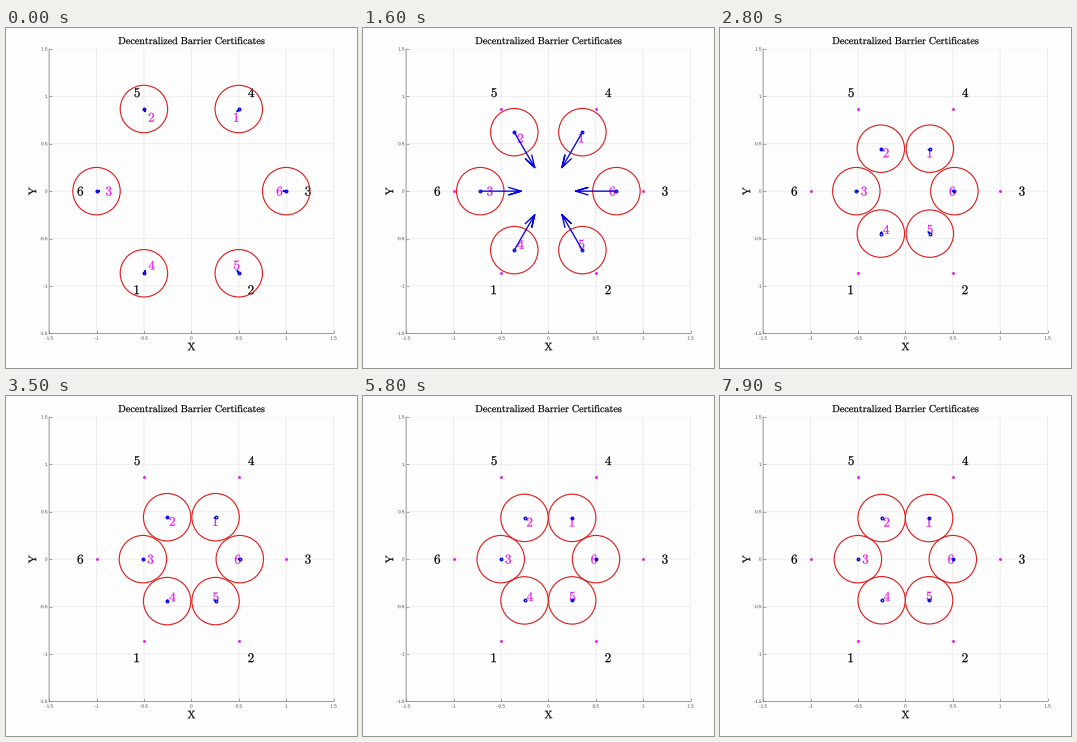
Animation, 351 px wide and 340 px high, one loop 8 s. Source, as a matplotlib script:

```python
import numpy as np
import matplotlib.pyplot as plt
from matplotlib.animation import FuncAnimation
from matplotlib.patches import Circle, PathPatch
from matplotlib.textpath import TextPath
from matplotlib.transforms import Affine2D

W, H, DPI = 351, 340, 100
FRAMES, STEP = 80, 100
SIDE, LEFT, TOP = 284.5, 43.1, 20.9
UNIT = SIDE / 3                    # pixels per data unit

RED, BLUE, MAGENTA = "#de1f1f", "#0808e0", "#e818e8"
PAPER = "#fdfdfd"
ANGLES = np.radians(60 * np.arange(1, 7))
DIRS = np.column_stack([np.cos(ANGLES), np.sin(ANGLES)])

# Speed-up, braking and settling of the common distance to the centre
V_MAX, V0, TAU = 0.367, 0.02, 1.19
T_BRAKE, T_SETTLE = 1.7, 2.8
R_END, GAP, TAU_END = 0.5, 0.017, 1.54
ARROW = 1.56                       # arrow length per unit of speed


def px(n):
    """Pixels to points."""
    return n * 72 / DPI


def approach(t):
    decay = np.exp(-t / TAU)
    dist = 1 - V_MAX * t + (V_MAX - V0) * TAU * (1 - decay)
    return dist, V_MAX - (V_MAX - V0) * decay


def settle(t):
    gap = GAP * np.exp(-(t - T_SETTLE) / TAU_END)
    return R_END + gap, gap / TAU_END


def brake(t):
    """Cubic Hermite blend between approach and settle."""
    (r0, v0), (r1, v1) = approach(T_BRAKE), settle(T_SETTLE)
    d = T_SETTLE - T_BRAKE
    s = (t - T_BRAKE) / d
    m0, m1 = -v0 * d, -v1 * d
    a = 2 * (r0 - r1) + m0 + m1
    b = 3 * (r1 - r0) - 2 * m0 - m1
    return ((a * s + b) * s + m0) * s + r0, -((3 * a * s + 2 * b) * s + m0) / d


def state(t):
    """Distance from the centre and inward speed at time t (seconds)."""
    if t < T_BRAKE:
        return approach(t)
    return brake(t) if t < T_SETTLE else settle(t)


plt.rcParams.update({"mathtext.fontset": "cm", "path.snap": False})
fig = plt.figure(figsize=(W / DPI, H / DPI), dpi=DPI, facecolor=PAPER)
ax = fig.add_axes([LEFT / W, 1 - (TOP + SIDE) / H, SIDE / W, SIDE / H],
                  facecolor=PAPER)
ax.set(xlim=(-1.5, 1.5), ylim=(-1.5, 1.5))
ax.set_axisbelow(True)


class Label:
    """Text as outlines, so it can sit between whole pixels."""

    def __init__(self, s, size, pos, color="black", align=0.5, math=True,
                 turn=0, weight=0.2, zorder=3):
        if math:
            s = r"$\mathrm{%s}$" % s.replace(" ", r"\ ")
        path = TextPath((0, 0), s, size=size, prop={"family": "Liberation Sans"})
        box = path.get_extents()
        shift = Affine2D().translate(-box.x0 - align * box.width,
                                     -box.y0 - box.height / 2)
        self.path = shift.rotate_deg(turn).scale(1 / UNIT).transform_path(path)
        self.patch = PathPatch(self.path, fc=color, ec=color, lw=px(weight),
                               clip_on=False, zorder=zorder)
        ax.add_artist(self.patch)
        self.patch.set_clip_on(False)
        self.move(pos)

    def move(self, pos):
        self.patch.set_transform(Affine2D().translate(*pos) + ax.transData)


def spot(x, y):
    """Stage pixels to data units."""
    return (x - LEFT) / UNIT - 1.5, 1.5 - (y - TOP) / UNIT


ticks = np.arange(-1.5, 1.6, 0.5)
ax.set_xticks(ticks, [])
ax.set_yticks(ticks, [])
ax.grid(color="#eaeaea", lw=px(0.8))
ax.tick_params(direction="in", length=px(2.8), width=px(0.6), color="#707070")
for side in ("top", "right"):
    ax.spines[side].set_visible(False)
for side in ("left", "bottom"):
    ax.spines[side].set(color="#858585", linewidth=px(0.8))

tick_style = dict(color="#404040", math=False, weight=0)
for v in ticks:
    Label(f"{v:g}", 4.6, (v, spot(0, 310)[1]), **tick_style)
    Label(f"{v:g}", 4.6, (spot(41.3, 0)[0], v), align=1, **tick_style)

Label("Decentralized Barrier Certificates", 10.05, spot(185.5, 12.6))
Label("X", 10.8, spot(185.5, 318.5))
Label("Y", 10.8, spot(26.4, 163.3), turn=90)


def digit(n, pos, color):
    return Label(str(n), 13.3, pos, color, align=0)


class Robot:
    def __init__(self, n, d):
        self.d = d
        self.side = np.array([-d[1], d[0]])
        digit((n + 2) % 6 + 1, 1.2 * d, "black")
        ax.plot(*d, "o", ms=px(2.9), mew=0, color=MAGENTA, zorder=3)
        self.label = digit(n, 0.9 * d, MAGENTA)
        self.ring = ax.add_patch(Circle(d, 0.25, fill=False, ec=RED,
                                        lw=px(1.15), zorder=4))
        self.arrow, = ax.plot([], [], color=BLUE, lw=px(1.35), zorder=5)
        self.dot, = ax.plot([], [], "o", ms=px(2.7), mfc="none", mec=BLUE,
                            mew=px(1.25), zorder=6)

    def move(self, dist, speed):
        pos = dist * self.d
        size = ARROW * speed
        tip = pos - size * self.d
        back = tip + 0.3 * size * self.d
        wing = 0.09 * size * self.side
        self.ring.center = pos
        self.label.move(0.9 * pos)
        self.dot.set_data(pos[:1], pos[1:])
        self.arrow.set_data(*np.array([pos, tip, back + wing, tip, back - wing]).T)


robots = [Robot(n, d) for n, d in enumerate(DIRS, 1)]


def update(i):
    dist, speed = state(i * STEP / 1000)
    for robot in robots:
        robot.move(dist, speed)
    return []


anim = FuncAnimation(fig, update, frames=FRAMES, interval=STEP,
                     init_func=lambda: update(0), repeat=True, repeat_delay=0)
plt.show()
```
